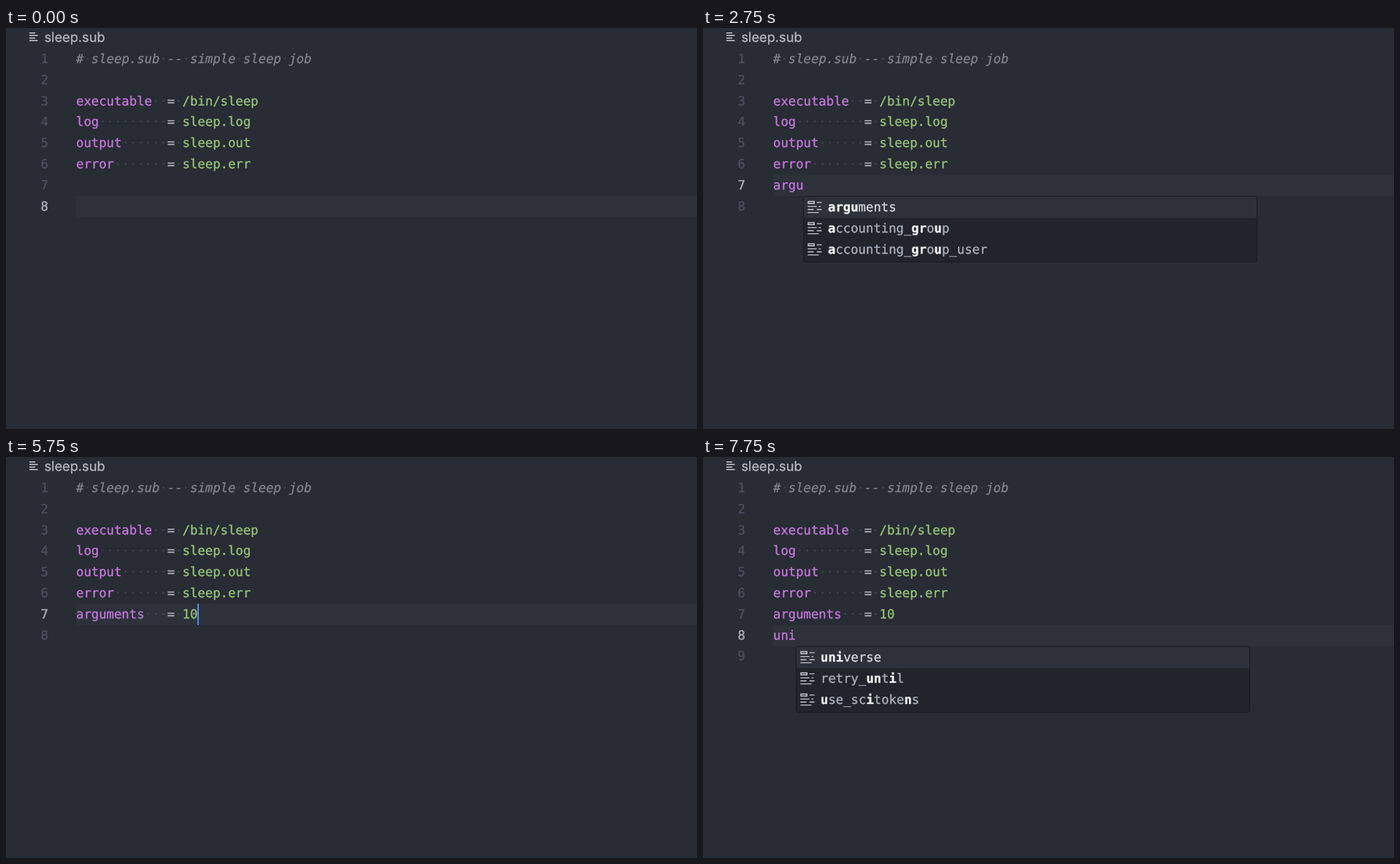
An HTML page for the animation above (8000 ms loop, 946x549 px).

```html
<!DOCTYPE html>
<html lang="en">
<head>
<meta charset="utf-8">
<title>Submit file editor</title>
<style>
  html, body { margin: 0; width: 100%; height: 100%; overflow: hidden; background: #282c34; }
  #stage {
    position: relative; width: 946px; height: 549px; overflow: hidden;
    background: #282c34; color: #abb2bf;
    font: 17.27px/28.8px "DejaVu Sans Mono", Menlo, monospace;
    text-rendering: geometricPrecision; white-space: pre;
    -webkit-text-stroke: 0.3px;
  }
  #stage div, #stage svg { position: absolute; }
  #icon, #view { left: 0; top: 0; }
  #view { width: 100%; height: 100%; }
  #title {
    left: 52.5px; top: -1px; color: #b4b8bf;
    font: 18.2px/28px Inter, "Liberation Sans", sans-serif;
  }
  .num { left: 0; width: 58px; text-align: right; color: #495162; }
  .num.on { color: #abb2bf; }
  .code { left: 96px; }
  .band { left: 96px; right: 0; height: 29px; background: #2c313a; }
  .caret { width: 2px; height: 29px; background: #528bff; }
  .key { color: #c678dd; }
  .val { color: #98c379; }
  .note { color: #7f848e; font-style: italic; }
  .dot { color: #41454d; -webkit-text-stroke: 0; }
  .popup {
    box-sizing: border-box; width: 622px; background: #21252b;
    border: 1px solid #181a1f; border-radius: 4px; overflow: hidden;
  }
  .item { left: 0; right: 0; height: 29px; }
  .item.on { background: #2c313a; color: #d7dae0; }
  .item span { position: absolute; left: 33px; top: 1px; }
  .item b { color: #f0f1f3; }
  .item svg { left: 4px; top: 3px; fill: #c5c8ce; }
  .thumb { right: 0; top: 0; width: 15px; height: 29px; background: #3b404a; }
</style>
</head>
<body>
<div id="stage">
  <svg id="icon" width="46" height="24" fill="#c8cacd">
    <path d="M32 6h8v1.6h-8zM32 9.5h11.5v1.6H32zM32 13h8v1.6h-8zM32 16.5h11.5v1.6H32z"/>
  </svg>
  <div id="title">sleep.sub</div>
  <div id="view"></div>
</div>
<script>
const LOOP = 8000, CHAR = 10.4, ROW = 28.8, LEFT = 96, TOP = 28.2;
const view = document.getElementById('view');

const head = [
  '# sleep.sub -- simple sleep job', '',
  'executable  = /bin/sleep',
  'log         = sleep.log',
  'output      = sleep.out',
  'error       = sleep.err'
];

// Matched letters stand between asterisks.
const lists = {
  ar: ['*ar*c_application', '*ar*c_resources', '*ar*c_rte', '*ar*guments', '*a*ws_*r*egion',
    'java_vm_*ar*gs', '*a*ccounting_g*r*oup', '*a*ccounting_g*r*oup_user',
    '*a*llowed_execute_du*r*ation', '*a*llowed_job_du*r*ation', '*a*zu*r*e_image',
    'batch_extra_submit_*ar*gs'],
  arg: ['*arg*uments', '*a*ws_*r*e*g*ion', 'java_vm_*arg*s', '*a*ccounting_*gr*oup',
    '*a*ccounting_*gr*oup_user', '*a*zu*r*e_ima*g*e', 'batch_extra_submit_*arg*s'],
  argu: ['*argu*ments', '*a*ccounting_*gr*o*u*p', '*a*ccounting_*gr*o*u*p_user'],
  all: ['accounting_group', 'accounting_group_user', 'allowed_execute_duration',
    'allowed_job_duration', 'arc_application', 'arc_resources', 'arc_rte', 'arguments',
    'aws_access_key_id_file', 'aws_region', 'aws_secret_access_key_file', 'azure_admin_key'],
  un: ['*un*iverse', 'retry_*un*til', '*u*se_scitoke*n*s', 'azure_admin_*u*ser*n*ame'],
  uni: ['*uni*verse', 'retry_*un*t*i*l', '*u*se_sc*i*toke*n*s']
};

// start time, lines after the fixed ones, active line, caret shown, popup list
const full = 'arguments   = 10';
const steps = [
  [0, ['', ''], 8, 0],
  [250, ['', ''], 8, 1],
  [750, ['', ''], 7, 1],
  [1250, ['', ''], 7, 0],
  [1750, ['a', ''], 7, 1],
  [2000, ['ar', ''], 7, 1, 'ar'],
  [2250, ['arg', ''], 7, 1, 'arg'],
  [2500, ['argu', ''], 7, 1, 'argu'],
  [2750, ['argu', ''], 7, 0, 'argu'],
  [3000, ['arguments', ''], 7, 1],
  [3500, ['arguments ', ''], 7, 1],
  [4000, ['arguments   ', ''], 7, 1],
  [4500, ['arguments   ', ''], 7, 0],
  [5000, ['arguments   =', ''], 7, 1],
  [5250, ['arguments   = ', ''], 7, 1, 'all'],
  [5750, [full, ''], 7, 1],
  [6250, [full, '', ''], 8, 1],
  [6750, [full, '', ''], 8, 0],
  [7000, [full, 'un', ''], 8, 1, 'un'],
  [7250, [full, 'uni', ''], 8, 1, 'uni'],
  [7750, [full, 'uni', ''], 8, 0, 'uni']
];

const rowTop = n => Math.round(TOP + ROW * (n - 1));
const textTop = n => Math.floor(TOP + 1.3 + ROW * (n - 1));
const span = (cls, text) =>
  `<span class="${cls}">${text.replace(/ +/g, s => `<span class="dot">${'·'.repeat(s.length)}</span>`)}</span>`;
const box = (cls, style, body = '') => `<div class="${cls}" style="${style}">${body}</div>`;

function paint(line) {
  if (line[0] === '#') return span('note', line);
  const [, key, eq, val] = line.match(/^(\w*)([ =]*)(.*)$/);
  return span('key', key) + span('', eq) + span('val', val);
}

const keyIcon = `<svg width="22" height="22" viewBox="0 0 16 16"><path fill-rule="evenodd"
  d="M1 2h7v3H1zM2 3v1h5V3zM10 3h5v1h-5zM1 7h9v1H1zM12 7h2v1h-2zM1 10h6v1H1zM10 10h5v1h-5zM1 13h11v1H1z"/></svg>`;

function popup(name, x, y) {
  const items = lists[name].map((label, i) => {
    const text = label.replace(/\*(.+?)\*/g, '<b>$1</b>');
    return box(i ? 'item' : 'item on', `top:${Math.round(i * ROW)}px`, `${keyIcon}<span>${text}</span>`);
  });
  const height = Math.round(items.length * ROW + 5);
  if (name === 'all') items.push(box('thumb', ''));
  return box('popup', `left:${x}px;top:${y}px;height:${height}px`, items.join(''));
}

function render([, tail, active, caret, list]) {
  const lines = head.concat(tail);
  const x = Math.floor(LEFT + CHAR * lines[active - 1].length);
  const y = rowTop(active);
  let html = box('band', `top:${y}px`);
  lines.forEach((line, i) => {
    const top = `top:${textTop(i + 1)}px`;
    html += box(i + 1 === active ? 'num on' : 'num', top, i + 1) + box('code', top, paint(line));
  });
  if (caret) html += box('caret', `left:${x}px;top:${y}px`);
  if (list) html += popup(list, x, rowTop(active + 1));
  view.innerHTML = html;
}

let shown;
const start = performance.now();
function tick() {
  const t = (performance.now() - start) % LOOP;
  const step = steps.findLast(s => s[0] <= t);
  if (step !== shown) render(shown = step);
  requestAnimationFrame(tick);
}
tick();
</script>
</body>
</html>
```
